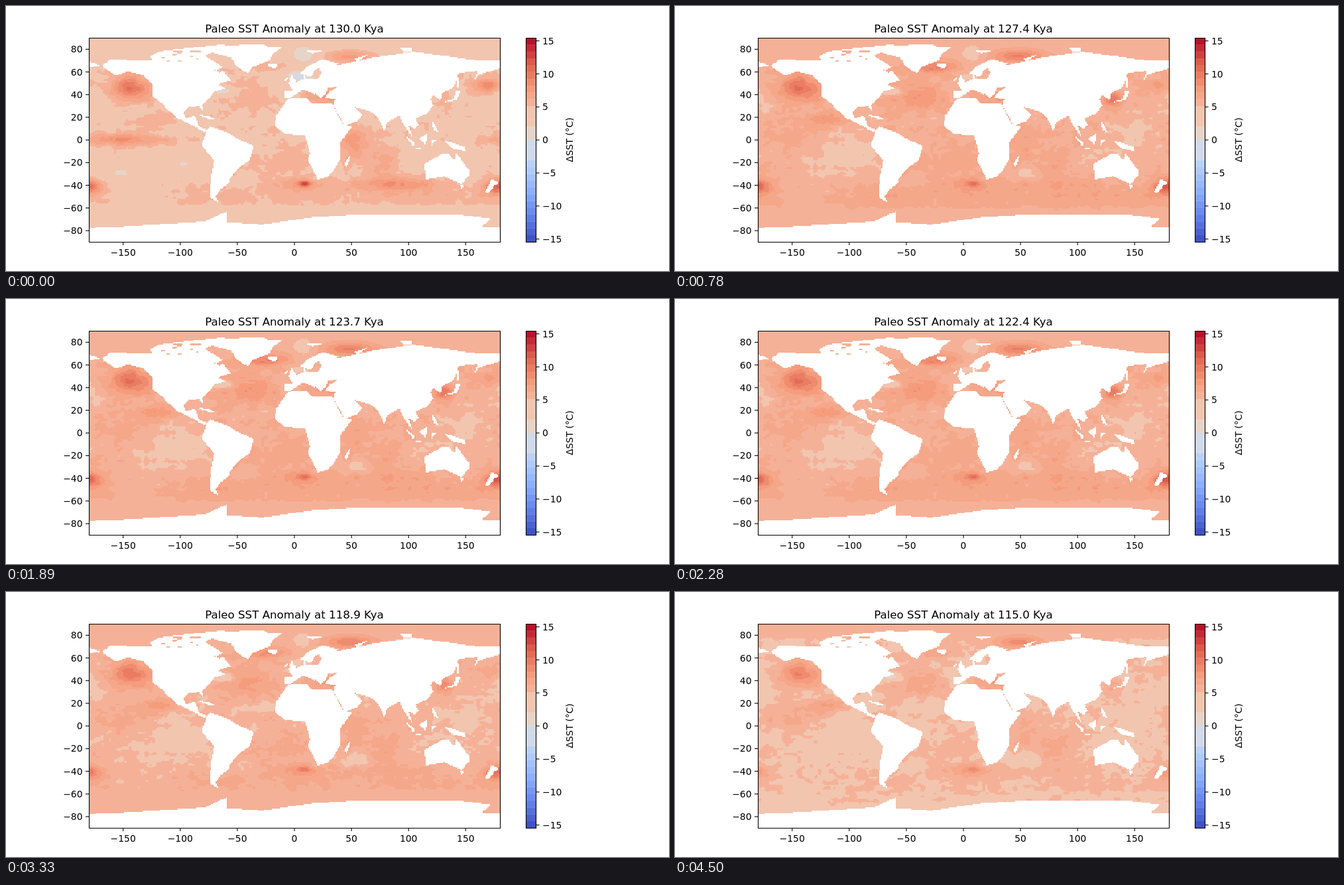
Animation, 1000 px wide and 400 px high, one loop 4.53 s. Source, as an HTML page with a canvas:

```html
<!DOCTYPE html>
<html lang="en">
<head>
<meta charset="utf-8">
<title>Paleo SST Anomaly</title>
<style>
html, body { margin: 0; width: 100%; height: 100%; overflow: hidden; background: #fff; }
canvas { position: absolute; left: 125px; top: 48px; width: 620px; height: 308px; image-rendering: pixelated; }
svg { position: absolute; left: 0; top: 0; }
text { font: 13.89px "DejaVu Sans", sans-serif; }
#title { font-size: 16.67px; }
</style>
</head>
<body>
<canvas id="map" width="360" height="180"></canvas>
<svg id="plot" width="1000" height="400"></svg>
<script>
const W = 360, H = 180;
const ctx = document.getElementById('map').getContext('2d');

const hash = (x, y) => {
  const s = Math.sin(x * 127.1 + y * 311.7) * 43758.5453;
  return s - Math.floor(s);
};
const ease = t => t * t * (3 - 2 * t);
function noise(x, y) {
  const i = Math.floor(x), j = Math.floor(y), u = ease(x - i), v = ease(y - j);
  const a = hash(i, j), b = hash(i + 1, j), c = hash(i, j + 1), d = hash(i + 1, j + 1);
  return a + (b - a) * u + (c - a) * v + (a - b - c + d) * u * v - .5;
}

// Coastlines in stage pixels, cut to one-degree cells
ctx.scale(W / 620, H / 308);
ctx.translate(-125, -48);
const land = d => ctx.fill(new Path2D(d));

function americas() {
  land(`M146 89L157 81 205 82 285 84 300 88 322 101 327 97 339 112 320 118 331 124 315 129 304 142 296 150 297 158
    291 151 275 153 267 162 272 170 285 165 291 182 303 187 299 190 273 176 257 169 240 148 251 163 234 146
    222 137 221 118 208 105 184 99 165 105 147 93Z`);
  land('M217 76L233 68 300 61 332 58 325 64 300 75 327 92 318 97 285 85 222 84Z');
  land('M309 70L330 60 388 58 397 62 417 62 402 72 398 82 372 92 365 101 349 93 340 78Z');
  land(`M303 187L308 182 334 191 350 201 374 211 367 233 352 244 336 262 337 267 324 276 316 288 321 297 307 289
    309 260 314 233 295 210Z`);
  land('M289 164l19 3 9 5-10-1z');
}
function africa() {
  land(`M425 140L453 138 461 147 492 148 509 180 522 182 503 207 504 231 495 247 485 258 470 262 455 232 459 223
    451 195 421 194 406 181 407 167Z`);
  land('M521 222L513 245 510 238Z');
}
function europe() {
  land(`M420 139V129L432 128 428 119 449 110 449 104 454 110 471 109 476 100 472 94 465 97 460 107 443 102 454 91
    478 80 503 87 494 90 530 85V132H507L502 122 486 123 483 131 475 139 458 125 467 134 448 126 431 138Z`);
  land('M426 119L438 115 430 103ZM418 113l6-6v5zM394 88h17l-4 6-9-1z');
}
function asia() {
  land(`M511 87L552 78 614 69 710 82 745 83V94L712 104 705 116 711 98 683 101 675 123 658 132 656 143 645 135
    640 141 507 132ZM125 83L142 90 125 93Z`);
  land(`M520 110L640 140 645 150 634 163 617 170 623 179 616 185 607 180 614 200 597 175 594 165 574 176 571 189
    560 167 549 159 524 152 538 164 531 173 511 181 494 150 497 140 481 139 486 131Z`);
  land('M523 81L552 71 532 82ZM453 67h26l-17 5zM595 64h17v4h-14z');
  land('M657 146L676 140 679 128 685 129 680 142ZM680 108h3v15h-3z');
}
function south() {
  land('M599 193L617 207 615 212ZM616 213l17 3h-15zM623 200L636 192 633 209ZM641 202l8-1-7 10zM642 171L652 190 645 188Z');
  land('M661 203L690 212 695 220 671 214Z');
  land('M631 238L660 222 669 223 671 230 677 232 679 221 699 249 699 255 687 269 662 257 634 262Z');
  land('M684 271h7l-3 5zM733 261L743 266 736 272 728 282 722 281Z');
  land('M125 335L178 333 300 325 333 310V326L385 330 460 319 525 315 690 316 731 321 718 333 745 334V356H125Z');
}
[americas, africa, europe, asia, south].forEach(f => f());

const lonOf = i => i % W - 179.5, latOf = i => 89.5 - Math.floor(i / W);
const strait = (lon, lat) => Math.abs(lon + 102) < 20 && Math.abs(lat - 74) < 5 && noise(lon / 5, lat / 1.5) > .2;
const img = ctx.getImageData(0, 0, W, H);
const sea = [];
for (let i = 0; i < W * H; i++) {
  if (img.data[i * 4 + 3] < 128 || strait(lonOf(i), latOf(i))) sea.push(i);
}
img.data.fill(255);

// Banded cool-to-warm palette, 30 bands over +-15.45 degrees
const BAND = 1.03;
const STOPS = ['3b4cc0', '6282ea', '8db0fe', 'b8d0f9', 'dddddd', 'f5c4ad', 'f59c7d', 'de604d', 'b40426']
  .map(s => [0, 2, 4].map(i => parseInt(s.slice(i, i + 2), 16)));
const palette = Array.from({ length: 30 }, (_, k) => {
  if (k > 11 && k < 15) return [209, 218, 234];
  if (k > 14 && k < 17) return [231, 212, 200];
  if (k > 16 && k < 20) return [242, 197, 175];
  const f = (k + .5) / 30 * 8, i = Math.floor(f);
  return STOPS[i].map((c, j) => Math.round(c + (STOPS[i + 1][j] - c) * (f - i)));
});

// Temperature fields: start, warm plateau, end
const fields = [4.65, 5.9, 5].map(base => Float32Array.from(sea, i => {
  const lon = lonOf(i), lat = latOf(i);
  const calm = Math.max(.12, Math.min(1, (76 - lat) / 12, (lat + 64) / 16));
  return base + calm * (noise(lon / 9, lat / 5) * 1.2 + noise(lon / 3.5 + 50, lat / 2.3) * .8);
}));

// Gaussian anomaly: centre, widths, strength in each field
function warm(lon, lat, sx, sy, ...amps) {
  sea.forEach((cell, n) => {
    const dx = ((lonOf(cell) - lon + 540) % 360 - 180) / sx, dy = (latOf(cell) - lat) / sy;
    const g = Math.exp(-(dx * dx + dy * dy) / 2);
    if (g > .002) amps.forEach((a, k) => fields[k][n] += a * g);
  });
}
function pacific() {
  warm(-143, 46, 12, 8, 5.5, 4.4, 4.1);
  warm(178, -41, 9, 5, 6, 5.2, 2.5);
  warm(-150, 0, 28, 3.5, 3.8, .7, .6);
  warm(-155, 9, 20, 6, .3, .6, 1.3);
  warm(-120, 18, 11, 3.5, 1.2, 2.1, 2.3);
  warm(-105, -13, 22, 14, -.3, -1.4, -.5);
  warm(-150, -28, 14, 5, -2.6, 0, 0);
  warm(-98, -22, 9, 5, -2.3, 0, 0);
  warm(-137, -48, 18, 8, -1.6, -1.1, -.4);
  warm(-95, -2, 9, 3, 0, -.3, -2);
  warm(-177, 35, 8, 7, -1.7, -1.1, -1);
  warm(168, 48, 9, 5, 4, 1.2, .5);
  warm(131, 36, 6, 4, 1, 4.5, 1.6);
  warm(152, 5, 18, 13, -.3, -1.1, -.7);
}
function atlantic() {
  warm(-63, 43, 7, 2.5, -5.3, -4.4, -4.8);
  warm(-42, 39, 18, 8, 1.3, 2.2, 1.9);
  warm(-28, 64, 15, 4, 1, 3.4, 1.6);
  warm(48, 74, 15, 4, 3, 3.6, 3.6);
  warm(8, 75, 8, 6, -4, -1.2, 0);
  warm(5, 56, 9, 4, -5.4, -.8, 0);
  warm(28, 38, 13, 5, 3, 1.6, 2.3);
  warm(-25, 16, 9, 4, -.3, -.6, -2.5);
  warm(-5, -18, 22, 13, 1, .8, .4);
  warm(9, -39, 3.5, 1.8, 6.4, 3, 2);
  warm(2, -39, 18, 4, 1.8, 1.3, 1.8);
}
function others() {
  warm(75, -17, 19, 12, 1.6, .8, 1.5);
  warm(90, -39, 25, 4.5, 3.6, 1.2, .8);
  warm(50, 0, 10, 8, 2.6, .8, .8);
  warm(55, -30, 8, 4, -.5, -1.8, -3.2);
  warm(106, -15, 10, 8, -2, -.9, -.2);
  warm(0, 86, 900, 7, -.8, -.3, .4);
  warm(0, -50, 900, 7, .8, .8, .2);
  warm(0, -67, 900, 5, -.5, 0, .1);
}
[pacific, atlantic, others].forEach(f => f());

// Axes and colour bar
const label = v => v < 0 ? '\u2212' + -v : v;
let svg = '<text id="title" x="435" y="40" text-anchor="middle"></text>';
const tick = (x, y, dx, dy) => { svg += `<path d="M${x} ${y}l${dx} ${dy}" stroke="#000" stroke-width="1.1"/>`; };
const text = (x, y, s, anchor) => { svg += `<text x="${x}" y="${y}" text-anchor="${anchor}">${s}</text>`; };
for (let v = -150; v <= 150; v += 50) {
  const x = 435 + v * 1.7222;
  tick(x, 356, 0, 5);
  text(x, 377, label(v), 'middle');
}
for (let v = -80; v <= 80; v += 20) {
  const y = 202.2 - v * 1.711;
  tick(125, y, -5, 0);
  text(115.5, y + 5, label(v), 'end');
}
palette.forEach((c, k) => {
  svg += `<rect x="784" y="${356 - (k + 1) * 308 / 30}" width="15.5" height="10.6" fill="rgb(${c})"/>`;
});
for (let v = -15; v <= 15; v += 5) {
  const y = 202.2 - v * 9.97;
  tick(799.5, y, 5, 0);
  text(809, y + 5, label(v), 'start');
}
svg += `<path d="M125.5 48.5h620v308h-620zM784.5 48.5h15v308h-15z" fill="none" stroke="#000" stroke-width="1.1"/>
  <text transform="translate(855 202) rotate(-90)" text-anchor="middle">ΔSST (°C)</text>`;
document.getElementById('plot').innerHTML = svg;
const title = document.getElementById('title');

let shown = -1;
function draw(now) {
  requestAnimationFrame(draw);
  const frame = Math.floor(now / 30) % 151;
  if (frame === shown) return;
  shown = frame;
  title.textContent = `Paleo SST Anomaly at ${(130 - frame / 10).toFixed(1)} Kya`;
  const rising = frame < 26;
  const t = rising ? frame / 26 : Math.max(0, (frame - 90) / 60);
  const [a, b] = rising ? fields : fields.slice(1);
  sea.forEach((cell, n) => {
    const v = a[n] + (b[n] - a[n]) * t;
    const band = Math.max(0, Math.min(29, Math.floor(v / BAND) + 15));
    img.data.set(palette[band], cell * 4);
  });
  ctx.putImageData(img, 0, 0);
}
draw(performance.now());
</script>
</body>
</html>
```
